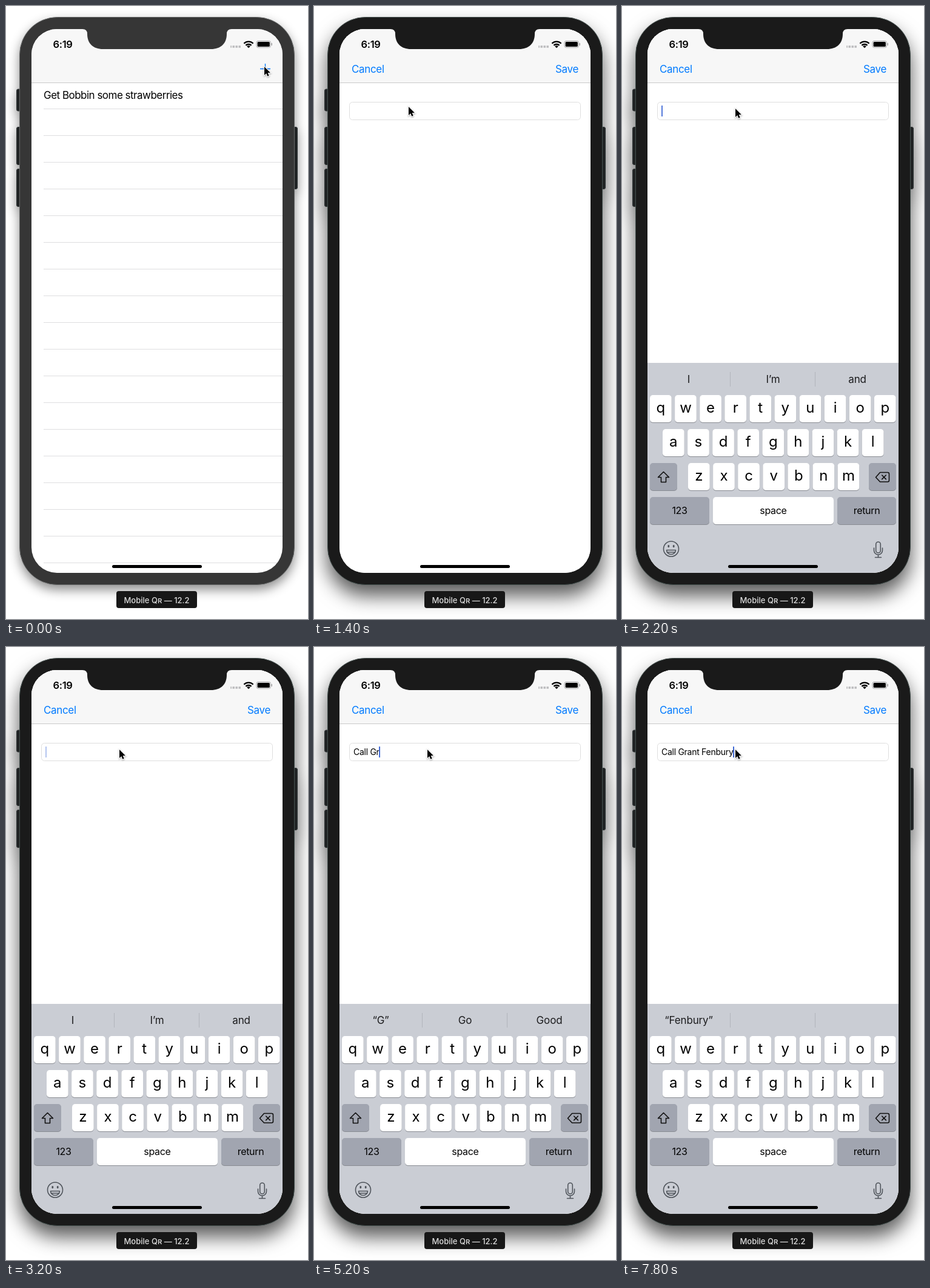
An HTML page that plays this animation: 498x1010 px, repeating every 8 s.

```html
<!DOCTYPE html>
<html lang="en">
<head>
<meta charset="utf-8">
<title>Adding a to-do</title>
<style>
  html, body { margin: 0; width: 100%; height: 100%; overflow: hidden; background: #fff; }
  svg { display: block; width: 498px; height: 1010px; }
  text { font: 17px Inter, Roboto, sans-serif; white-space: pre; }
  .row { letter-spacing: -.03em; }
  .link { fill: #007aff; letter-spacing: -.02em; }
  .entry { font-size: 14px; letter-spacing: -.02em; }
  .mid { text-anchor: middle; }
  .hint { fill: #1c1c1e; letter-spacing: -.01em; }
  .letter { font-size: 24px; }
  .word { font-size: 16px; letter-spacing: -.02em; }
  .clock { font-size: 16.5px; font-weight: 600; letter-spacing: -.02em; }
  .label { font-size: 13px; font-weight: 500; fill: #ddd; }
  .line { fill: none; stroke-linecap: round; stroke-linejoin: round; }
</style>
</head>
<body>
<svg viewBox="0 0 498 1010">
  <defs>
    <clipPath id="screen"><rect x="42" y="38" width="414" height="896" rx="42"/></clipPath>
  </defs>

  <g id="device" stroke-width="1">
    <g fill="#202324" stroke="#34393a">
      <rect x="17.5" y="137" width="9" height="36" rx="2.5"/>
      <rect x="17.5" y="199.500" width="9" height="62" rx="2.5"/>
      <rect x="17.5" y="268.500" width="9" height="62" rx="2.5"/>
      <rect x="471.500" y="199.500" width="9" height="102" rx="2.5"/>
    </g>
    <rect id="body" x="22.5" y="18.500" width="453" height="935" rx="62"/>
  </g>

  <g clip-path="url(#screen)">
    <rect x="42" y="38" width="414" height="896" fill="#fff"/>
    <rect x="42" y="38" width="414" height="88" fill="#f7f7f7"/>
    <path d="M42 126.500H456" stroke="#c9c9c9"/>
    <path d="M419 103.500H436M427.500 95V112" stroke="#007aff" stroke-width="1.3"/>
    <text class="row" x="62" y="153">Get Bobbin some strawberries</text>
    <path id="rows" stroke="#dedee0"/>

    <g id="sheet">
      <rect x="42" y="38" width="414" height="896" fill="#fff"/>
      <rect x="42" y="38" width="414" height="88" fill="#f7f7f7"/>
      <path d="M42 126.500H456" stroke="#c9c9c9"/>
      <text class="link" x="62" y="110">Cancel</text>
      <text class="link" x="436" y="110" text-anchor="end">Save</text>
      <rect x="58.500" y="158.500" width="381" height="29" rx="5" fill="#fff" stroke="#dedede"/>
      <text class="entry" id="entry" x="65" y="178"></text>
      <rect id="caret" y="164" width="2" height="18" fill="#426bd6"/>
    </g>

    <g id="keyboard">
      <rect x="42" y="588" width="414" height="346" fill="#cacdd4"/>
      <path d="M178.500 603V627M318.500 603V627" stroke="#b2b5bc"/>
      <g id="hints"></g>
      <g id="keys"></g>
      <g class="line" stroke="#111" stroke-width="1.6">
        <path d="M68.500 767.500L59.500 776.500H64.500V784.500H72.500V776.500H77.500Z"/>
        <path d="M418.500 776.500L425.500 768.500H438Q440.500 768.500 440.500 771V781.500Q440.500 784 438 784H425.500ZM428.700 773L435.300 779.600M435.300 773L428.700 779.600"/>
      </g>
      <g class="line" stroke="#50555c" stroke-width="1.6">
        <circle cx="81" cy="894.500" r="12.5"/>
        <path d="M73.500 896.500H88.500A7.500 7 0 0 1 73.500 896.500ZM75 900H87"/>
        <path d="M76.800 889.500V890.800M85.200 889.500V890.800" stroke-width="2.8"/>
        <rect x="418.700" y="883" width="7.600" height="18" rx="3.8"/>
        <path d="M415.500 893V897A7 7 0 0 0 429.500 897V893M422.500 904V908.500M417.500 908.500H427.500"/>
      </g>
    </g>

    <path id="notch" d="M126 37V38Q134 38 134 46C134 62 144 71 160 71H338C354 71 364 62 364 46Q364 38 372 38V37Z"/>
    <text class="clock mid" x="93.500" y="68.500">6:19</text>
    <path d="M370.200 67H387" stroke="#bdbdbf" stroke-width="3.6" stroke-dasharray="3.600 1.400" stroke-dashoffset="1.800"/>
    <path d="M392.400 61.800A10.800 10.800 0 0 1 407.600 61.800M395.400 64.900A6.500 6.500 0 0 1 404.600 64.900" fill="none" stroke="#000" stroke-width="2.300"/>
    <path d="M400 69.200L397.200 66.500A4 4 0 0 1 402.800 66.500Z"/>
    <rect x="413" y="57.500" width="23.500" height="11" rx="3" fill="none" stroke="#a5a5a7"/>
    <rect x="414.600" y="59" width="20.300" height="8" rx="1.600"/>
    <path d="M438.300 61V65" stroke="#a5a5a7" stroke-width="1.400"/>
    <rect x="175" y="921" width="148" height="5" rx="2.500"/>
  </g>

  <rect x="182" y="964" width="133" height="28" rx="4" fill="#171717"/>
  <text class="label mid" x="248.500" y="984">Mobile Qʀ — 12.2</text>

  <path id="pointer" d="M0 0V14L3.200 11L5.300 15.800L7.700 14.700L5.700 10.100H10Z" stroke="#fff" stroke-width="2"
        paint-order="stroke" style="filter:drop-shadow(0 1px 1px rgba(0,0,0,.35))"/>
</svg>

<script>
const $ = id => document.getElementById(id);
const LOOP = 8000, STEP = 200;
const MESSAGE = 'Call Grant Fenbury';

// [time, letters typed, suggestions, shift of the middle suggestion]
const TYPING = [
  [0, 0, 'I|I’m|and'],
  [3800, 1, 'I|I’m|and'],
  [4000, 2, '“C”|Can|Can’t'],
  [4200, 4, '“C”|Can|Can’t'],
  [4400, 4, '“Call”|Called|Calls'],
  [4600, 5, '“Call”|Called|Calls'],
  [4800, 5, 'me|you|the'],
  [5000, 6, 'me|you|the'],
  [5200, 7, '“G”|Go|Good'],
  [5400, 8, '“Gr”|Great|Group'],
  [5600, 9, '“Gra”|Grand|Grab'],
  [5800, 10, '“Gran”|Grand|Granted'],
  [6000, 10, '“Gran”|Granted|Grants'],
  [6200, 11, '“Grant”|Granted|Grantable', -12],
  [6400, 12, '“Grant”|Granted|Grantable'],
  [6600, 13, '“F”|For|From'],
  [6800, 14, '“Fe”|Feel|Few'],
  [7000, 15, '“Fen”|Fence|Fender'],
  [7200, 16, '“Fen”|Fence|Fender'],
  [7400, 17, '“Fenbu”||'],
  [7600, 18, '“Fenbur”||'],
  [7800, 18, '“Fenbury”||']
];

// [time, x, y]
const POINTER = [
  [0, 426, 100], [200, 425, 102], [1200, 156, 162],
  [1400, 156, 166], [1600, 156, 166], [1800, 187, 169]
];

// [time, opacity]
const CARET = [
  [0, 0], [2000, 1], [2200, .9], [2400, 0], [2800, .5],
  [3000, 1], [3200, .4], [3400, 0], [3800, 1]
];

const latest = (list, time) => list.filter(item => item[0] <= time).pop();

function key(x, y, width, label, { fill = '#fff', style = 'letter', base = 29 } = {}) {
  const box = (dy, color) =>
    `<rect x="${x}" y="${y + dy}" width="${width}" height="45" rx="5" fill="${color}"/>`;
  return box(1, '#898c93') + box(0, fill) +
    `<text class="${style} mid" x="${x + width / 2}" y="${y + base}">${label}</text>`;
}

function buildKeys() {
  const dark = { fill: '#a1a5b0', style: 'word', base: 27.5 };
  const letters = [['qwertyuiop', 46, 641], ['asdfghjkl', 67, 697], ['zxcvbnm', 109, 753]]
    .map(([row, x, y]) => [...row].map((c, i) => key(x + i * 41.1, y, 35.7, c)).join(''));
  return letters.join('') +
    key(46, 753, 45, '', dark) + key(407, 753, 45, '', dark) +
    key(46, 809, 98, '123', dark) + key(355, 809, 97, 'return', dark) +
    key(150, 809, 199, 'space', { ...dark, fill: '#fff' });
}

$('keys').innerHTML = buildKeys();
$('hints').innerHTML = [110, 249, 388]
  .map(x => `<text class="hint mid" x="${x}" y="621"></text>`).join('');
$('rows').setAttribute('d',
  Array.from({ length: 18 }, (_, i) => `M62 ${169.5 + 44 * i}H456`).join(''));
const hints = [...$('hints').children];

// Distance still to travel on a critically damped spring.
function remaining(time, start, distance) {
  const s = Math.max(0, time - start) / 1000 * Math.sqrt(1000 / 3);
  const left = distance * (1 + s) * Math.exp(-s);
  return left < 2 ? 0 : Math.round(left);
}

function pointerAt(time) {
  const from = latest(POINTER, time);
  const to = POINTER[POINTER.indexOf(from) + 1] || from;
  const p = to === from ? 0 : (time - from[0]) / (to[0] - from[0]);
  const ease = p * p * (3 - 2 * p);
  return [1, 2].map(i => from[i] + (to[i] - from[i]) * ease);
}

function draw(time) {
  const active = time >= STEP;
  const shell = active ? '#1a1a1a' : '#363636';
  $('body').setAttribute('fill', shell);
  $('body').setAttribute('stroke', active ? '#465250' : '#686a6a');
  $('notch').setAttribute('fill', shell);
  $('device').style.filter = active
    ? 'drop-shadow(0 18px 16px rgba(0,0,0,.65))'
    : 'drop-shadow(0 8px 9px rgba(0,0,0,.45))';

  $('sheet').setAttribute('transform', `translate(0 ${remaining(time, 165.8, 896)})`);
  $('keyboard').setAttribute('transform', `translate(0 ${remaining(time, 1770, 346)})`);
  $('pointer').setAttribute('transform', `translate(${pointerAt(time)})`);

  const [, count, words, shift = 0] = latest(TYPING, time);
  const entry = $('entry');
  entry.textContent = MESSAGE.slice(0, count);
  words.split('|').forEach((word, i) => hints[i].textContent = word);
  hints[1].setAttribute('x', 249 + shift);
  $('caret').setAttribute('x', 65 + (count ? entry.getComputedTextLength() - .5 : 0));
  $('caret').setAttribute('opacity', latest(CARET, time)[1]);
}

const begin = performance.now();
let shown = -1;
function tick() {
  const elapsed = (performance.now() - begin) % LOOP;
  const time = Math.floor(elapsed / STEP) * STEP;
  if (time !== shown) draw(shown = time);
  requestAnimationFrame(tick);
}
tick();
</script>
</body>
</html>
```
